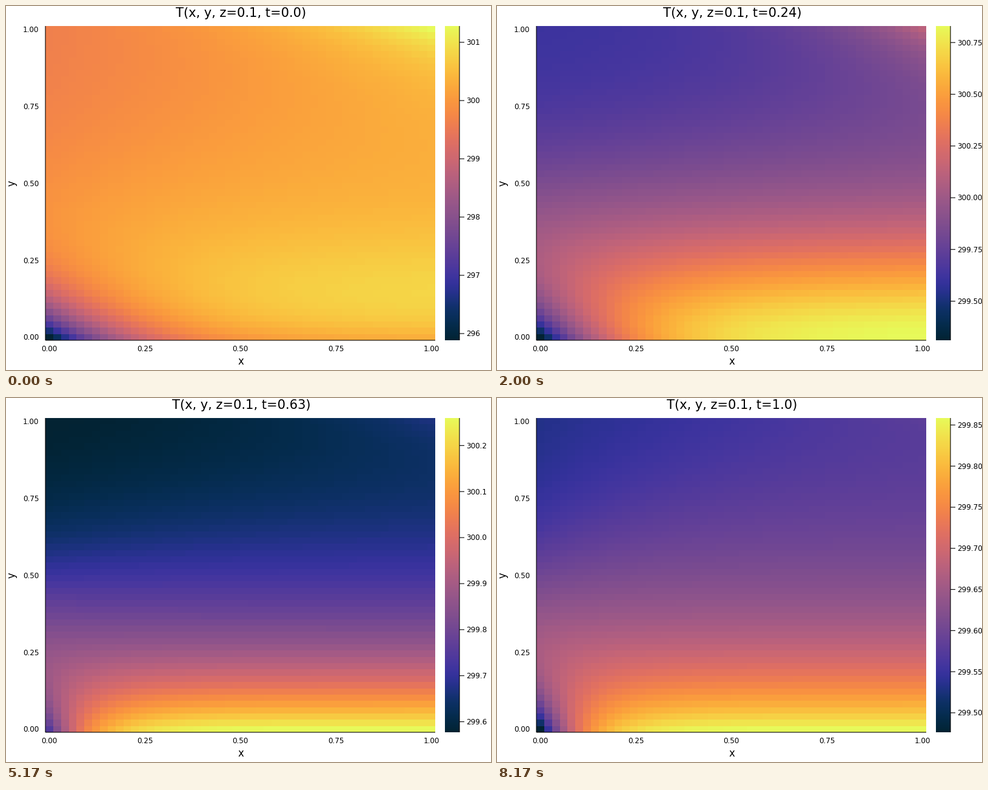
A matplotlib script that plays this animation: 800x600 px, repeating every 8.34 s.

```python
import numpy as np
import matplotlib.pyplot as plt
from matplotlib.animation import FuncAnimation
from matplotlib.colors import ListedColormap

W, H, DPI = 800, 600, 100
STEPS, LOOP, TICK = 50, 8340, 30           # field states, loop ms, frame ms
N = 50                                     # cells per side
PX = 72 / DPI                              # points per pixel
LEFT, RIGHT, TOP, BOTTOM = 65, 708, 33, 551
BAR = (724, 748)

# Dark teal -> violet -> orange -> yellow
STOPS = np.array([(3, 35, 51), (13, 48, 100), (53, 50, 155), (93, 62, 153),
                  (126, 77, 143), (158, 89, 135), (193, 100, 121), (225, 113, 97),
                  (246, 139, 69), (251, 173, 60), (246, 211, 70), (231, 250, 90)])


def smooth_ramp(stops, n=256):
    """Cubic Hermite curve through evenly spaced colours."""
    slope = np.gradient(stops, axis=0, edge_order=2)
    x = np.linspace(0, len(stops) - 1, n)
    i = np.minimum(x.astype(int), len(stops) - 2)
    u = (x - i)[:, None]
    ramp = ((1 + 2 * u) * (1 - u) ** 2 * stops[i] + u * u * (3 - 2 * u) * stops[i + 1]
            + u * (1 - u) * ((1 - u) * slope[i] - u * slope[i + 1]))
    return np.clip(ramp / 255, 0, 1)


THERMAL = ListedColormap(smooth_ramp(STOPS))
exp = np.exp
grid = np.linspace(0, 1, N)


def cold_edge(y, t):
    """Temperature above 300 along x=0: broad warm bump minus a cold corner."""
    base = -.385 - .085 * t ** 1.5
    bump = 1.35 * exp(-1.7 * t) * exp(-4.5 * y ** 2)
    corner = (5.08 * exp(-6.2 * t) + .29 * t) * exp(-y / .145)
    return base + bump - corner


def warm_edge(y, t):
    """Temperature above 300 along x=1: warm floor, short-lived dip, hot corner."""
    base = -.45 + .73 * exp(-4.6 * t)
    amp = 1.1 / (1 + (t / .73) ** 3.1)
    power = 1 + 1 / (1 + (t / .29) ** 4)
    rate = 3.2 - .55 * exp(-((t - .19) / .08) ** 2)
    dip = 1.05 * exp(-16 * t - y / .13)
    hot = exp(-4.6 * t - 10 * (1 - y))
    return base + amp * exp(-(rate * y) ** power) - dip + hot


def field(t):
    y = grid[:, None]
    cold, warm = cold_edge(y, t), warm_edge(y, t)
    # Decay rate in x, from the floor (y=0) to the top (y=1)
    u = np.clip((t - .3) / .45, 0, 1)
    k0 = 5 + 5.2 * u * u * (3 - 2 * u)
    k1 = -1.6 + 1.6 * t - 2.3 * np.sin(np.pi * t ** .6)
    k = k0 + (k1 - k0) * y
    k = np.where(np.abs(k) < 1e-3, 1e-3, k)
    weight = (exp(-k * grid) - exp(-k)) / (1 - exp(-k))
    return 300 + warm + (cold - warm) * weight


def bar_ticks(lo, hi):
    """Finest round step that gives fewer than ten intervals."""
    for step, digits in ((.025, 3), (.05, 2), (.1, 1), (.25, 2), (.5, 1), (1, 0)):
        if (hi - lo) / step < 10:
            break
    first, last = np.ceil(lo / step), np.floor(hi / step)
    return [(v, f"{v:.{digits}f}") for v in np.arange(first, last + 1) * step]


fig = plt.figure(figsize=(W / DPI, H / DPI), dpi=DPI, facecolor="white")
ax = fig.add_axes([0, 0, 1, 1])


def label(x, y, text, px, ha="center", va="baseline", **kw):
    return ax.text(x, y, text, fontsize=px * PX, family="DejaVu Sans",
                   color="black", ha=ha, va=va, **kw)


def line(xs, ys):
    return ax.plot(xs, ys, color="black", lw=1.1 * PX, snap=False,
                   solid_capstyle="butt")[0]


def image(data, left, right):
    return ax.imshow(data, cmap=THERMAL, origin="lower", aspect="auto",
                     interpolation="nearest", extent=(left, right, BOTTOM, TOP))


heat = image(field(0), LEFT, RIGHT)
image(np.arange(256)[:, None], *BAR)
ax.set(xlim=(0, W), ylim=(H, 0))
ax.axis("off")

line([LEFT] * 2, [TOP, BOTTOM])
line([LEFT, RIGHT], [BOTTOM] * 2)
line([BAR[1]] * 2, [TOP, BOTTOM])

cw, ch = (RIGHT - LEFT) / N, (BOTTOM - TOP) / N
for v in np.linspace(0, 1, 5):
    label(LEFT + cw / 2 + v * (N - 1) * cw, 569, f"{v:.2f}", 12)
    label(54.5, BOTTOM - ch / 2 - v * (N - 1) * ch + 4.6, f"{v:.2f}", 12, ha="right")
label(387, 591, "x", 16.5)
label(10, 292, "y", 16.5, va="center", rotation=90)
title = label(388, 18.3, "", 21)

marks = [(line([BAR[1], BAR[1] + 8], [0, 0]), label(759, 0, "", 12, ha="left"))
         for _ in range(12)]


def draw(i):
    # States follow each other at 6 per second, on a clock of 10 ms
    now = (i + 1) * TICK - 10
    step = min(int((now + 5) * 6 / 1000), STEPS - 1)
    t = step / (STEPS - 1)
    temp = field(t)
    lo, hi = temp.min(), temp.max()
    heat.set_data(temp)
    heat.set_clim(lo, hi)
    title.set_text(f"T(x, y, z=0.1, t={round(t, 2)})")
    ticks = bar_ticks(lo, hi)
    for n, (mark, text) in enumerate(marks):
        shown = n < len(ticks)
        mark.set_visible(shown)
        text.set_visible(shown)
        if shown:
            v, s = ticks[n]
            y = BOTTOM - (v - lo) / (hi - lo) * (BOTTOM - TOP)
            mark.set_ydata([y, y])
            text.set_y(y + 4.4)
            text.set_text(s)
    return []


anim = FuncAnimation(fig, draw, frames=LOOP // TICK, interval=TICK,
                     repeat=True, repeat_delay=0, blit=False)
plt.show()
```
